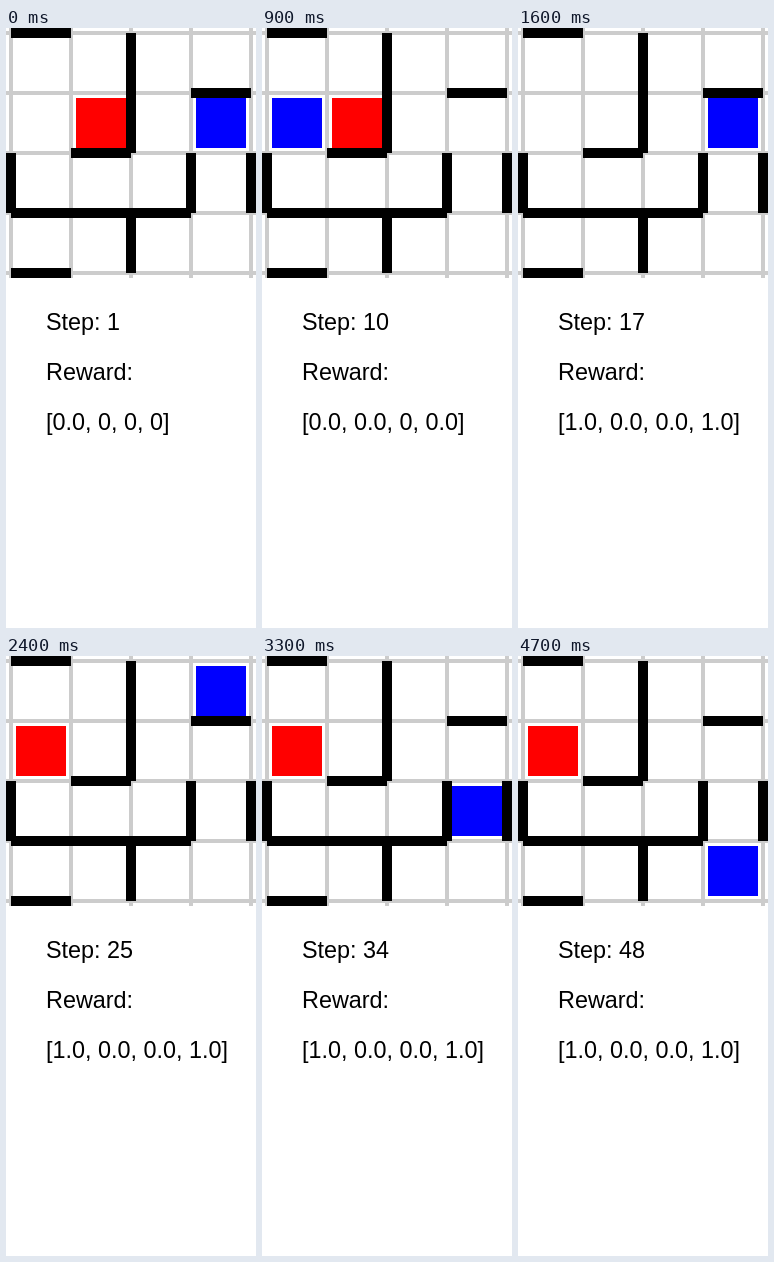
An HTML page with a canvas that plays this animation: 250x600 px, repeating every 4800 ms.

```html
<!DOCTYPE html>
<html>
<head>
<meta charset="utf-8">
<style>
  html, body { margin: 0; width: 100%; height: 100%; overflow: hidden; background: #fff; }
  canvas { display: block; }
</style>
</head>
<body>
<canvas id="stage" width="250" height="600"></canvas>
<script>
const ctx = document.getElementById('stage').getContext('2d');
const N = 4, CELL = 60, EDGE = 5, STEP_MS = 100;

// Cells (column + row) closed on their top or left side; the board wraps around.
const topWalls = ['00', '31', '12', '03', '13', '23'];
const leftWalls = ['20', '21', '02', '32', '23'];

const actions = 'DURL';
const delta = { D: [0, 1], U: [0, -1], R: [1, 0], L: [-1, 0] };
const moves = 'LLDLLLUUD' + 'URRRDLL' + 'LLLULRDD' + 'DLLDRU' + 'DLR' + 'LDLDULU' + 'DDRUDRD';
const goals = [[1, 1], [3, 1], [0, 1]];

const key = (x, y) => `${x}${y}`;
const wrap = n => (n + N) % N;

function simulate() {
  let x = 3, y = 1, goal = 0, caught = false;
  const rewards = [0, null, null, null];
  const states = [];
  const record = () => states.push({
    agent: [x, y],
    goal: goals[goal],
    rewards: `[${rewards.map(r => r === null ? '0' : r.toFixed(1)).join(', ')}]`
  });
  record();
  for (const move of moves) {
    if (caught) goal++;
    const [dx, dy] = delta[move];
    const nx = wrap(x + dx), ny = wrap(y + dy);
    const walls = dy ? topWalls : leftWalls;
    const gate = dx + dy > 0 ? key(nx, ny) : key(x, y);
    if (!walls.includes(gate)) [x, y] = [nx, ny];
    caught = x === goals[goal][0] && y === goals[goal][1];
    rewards[actions.indexOf(move)] += caught ? 1 : 0;
    record();
  }
  return states;
}

const at = n => EDGE + n * CELL;

function square([x, y], color) {
  ctx.fillStyle = color;
  ctx.fillRect(at(x) + 5, at(y) + 5, 50, 50);
}

function drawGrid() {
  ctx.fillStyle = '#ccc';
  for (let i = 0; i <= N; i++) {
    ctx.fillRect(at(i) - 2, 0, 4, 250);
    ctx.fillRect(0, at(i) - 2, 250, 4);
  }
}

function drawWalls() {
  ctx.fillStyle = '#000';
  for (const [x, y] of topWalls) {
    for (const row of +y ? [+y] : [0, N]) ctx.fillRect(at(+x), at(row) - 5, CELL, 10);
  }
  for (const [x, y] of leftWalls) {
    for (const col of +x ? [+x] : [0, N]) ctx.fillRect(at(col) - 5, at(+y), 10, CELL);
  }
}

const states = simulate();

function draw(now) {
  const step = Math.floor(now / STEP_MS) % states.length;
  const { agent, goal, rewards } = states[step];
  ctx.fillStyle = '#fff';
  ctx.fillRect(0, 0, 250, 600);
  drawGrid();
  square(goal, '#f00');
  square(agent, '#00f');
  drawWalls();
  ctx.font = '23.4px "Liberation Sans", Arial, sans-serif';
  ctx.fillText(`Step: ${step + 1}`, 40, 302);
  ctx.fillText('Reward:', 40, 352);
  ctx.fillText(rewards, 40, 402);
}

const start = performance.now();
function tick() {
  draw(performance.now() - start);
  requestAnimationFrame(tick);
}
tick();
</script>
</body>
</html>
```
